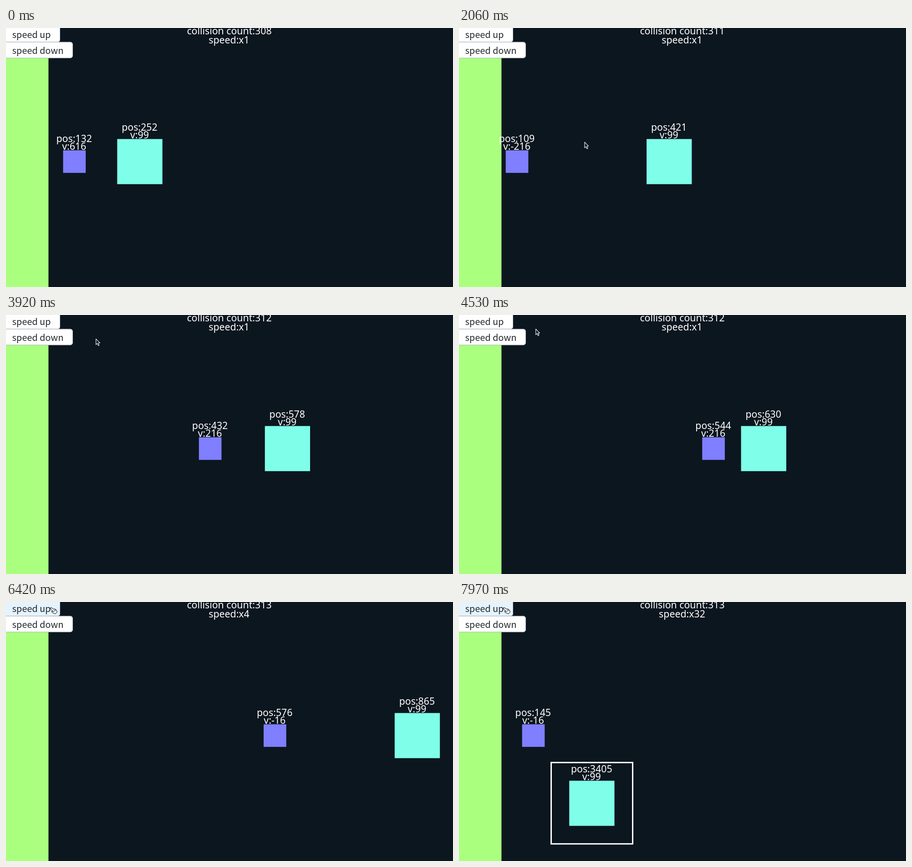
These frames come from a looping animation (982x570 px, 7.99 s). An HTML page with a canvas:

```html
<!DOCTYPE html>
<html lang="en">
<head>
<meta charset="utf-8">
<title>Block collisions</title>
<style>
  html, body { margin: 0; width: 100%; height: 100%; overflow: hidden; background: #0c161f; }
  canvas { display: block; }
</style>
</head>
<body>
<canvas id="stage" width="982" height="570"></canvas>
<script>
const ctx = document.getElementById('stage').getContext('2d');
const LOOP = 7990;
const SCALE = 0.993, OFFSET = -6;
const WALL = 100, SMALL = 50, BIG = 100, MID_Y = 294;
const BIG_V = 99.995;
const LABEL_FONT = '300 21.3px "Noto Sans", sans-serif';
const BUTTON_FONT = '19.9px "Noto Sans CJK JP", "Noto Sans", sans-serif';

// [ms, simulated seconds] at normal speed
const clock = [[0, 0], [1240, 0.986], [2850, 2.367], [3920, 3.267], [5190, 4.335]];
const RATE = 0.842;
// each click doubles the speed
const clicks = [5875, 6238, 6595, 6957, 7322.6];

// [ms, x, y] of the pointer tip
const pointerPath = [
  [1290, 890, 570], [1600, 560, 325], [2000, 300, 260], [2450, 118, 190],
  [2850, 185, 123], [3220, 195, 76], [3920, 197, 52], [4040, 196, 50],
  [4830, 151, 18], [5190, 130, 16], [5560, 97, 12]
];

function interpolate(points, t, col) {
  const next = points.findIndex(p => p[0] > t);
  if (next < 0) return points[points.length - 1][col];
  if (next === 0) return points[0][col];
  const a = points[next - 1], b = points[next];
  return a[col] + (b[col] - a[col]) * (t - a[0]) / (b[0] - a[0]);
}

function simTime(t) {
  const [start, base] = clock[clock.length - 1];
  if (t <= start) return interpolate(clock, t, 1);
  let s = base, from = start, speed = 1;
  for (const click of clicks) {
    if (click >= t) break;
    s += (click - from) / 1000 * RATE * speed;
    from = click;
    speed *= 2;
  }
  return s + (t - from) / 1000 * RATE * speed;
}

// The large block is so heavy that its velocity stays constant.
function simulate(s) {
  let now = 0, x = 131.9, v = 616.92, count = 308;
  const bigAt = time => 252 + BIG_V * time;
  while (true) {
    const wait = v > BIG_V ? (bigAt(now) - x - SMALL) / (v - BIG_V)
      : v < 0 ? (WALL - x) / v : Infinity;
    if (now + wait > s) break;
    now += wait;
    x += v * wait;
    v = v > 0 ? 2 * BIG_V - v : -v;
    count++;
  }
  return { x: x + v * (s - now), v, big: bigAt(s), count };
}

function label(text, x, y) {
  ctx.font = LABEL_FONT;
  ctx.textAlign = 'center';
  ctx.fillStyle = '#fff';
  ctx.fillText(text, x, y);
}

function block(left, midY, size, color, pos, v) {
  const w = size * SCALE, top = midY - w / 2, cx = left + w / 2 - 0.6;
  ctx.fillStyle = color;
  ctx.fillRect(left, top, w, w);
  label('pos:' + Math.trunc(pos), cx, top - 18);
  label('v:' + Math.trunc(v), cx, top - 1.3);
}

function button(text, y, right, hover) {
  ctx.beginPath();
  ctx.roundRect(-10, y + 0.5, right + 9.5, 35, 5);
  ctx.fillStyle = hover ? '#e5f3ff' : '#fff';
  ctx.fill();
  ctx.strokeStyle = '#a9b0b8';
  ctx.lineWidth = 1;
  ctx.stroke();
  ctx.font = BUTTON_FONT;
  ctx.textAlign = 'left';
  ctx.fillStyle = '#212529';
  ctx.fillText(text, 13.5, y + 26);
}

function shape(path, x, y, fill, stroke) {
  ctx.save();
  ctx.translate(x, y);
  ctx.lineWidth = 1.1;
  ctx.lineJoin = 'round';
  const p = new Path2D(path);
  ctx.fillStyle = fill;
  ctx.fill(p);
  ctx.strokeStyle = stroke;
  ctx.stroke(p);
  ctx.restore();
}

const ARROW = 'M.7 .7V13.2L3.6 10.6L5.6 15.3L7.7 14.4L5.7 9.8L9.3 9.5Z';
const HAND = 'M.5 1.2Q1.5 -.2 3 .8L7 3.6L10 3.2L13.2 5.5L15.5 9.5L11.5 14L7 12.2L3 9.6L4 8.2L6.4 8.8L1 3Q0 2 .5 1.2Z';

function pointer(t, hover) {
  if (t < pointerPath[0][0]) return;
  const x = interpolate(pointerPath, t, 1), y = interpolate(pointerPath, t, 2);
  if (!hover) return shape(ARROW, x, y, '#0c161f', '#fff');
  shape(HAND, x, y, '#fff', '#222');
  shape('M6 8L8.5 9.8M8 6.2L10.8 8.3M10 4.8L12.6 7', x, y, 'transparent', '#444');
}

function draw(t) {
  const { x, v, big, count } = simulate(simTime(t));
  const speed = 2 ** clicks.filter(c => c < t).length;
  const hover = t > 5325;

  ctx.fillStyle = '#0c161f';
  ctx.fillRect(0, 0, 982, 570);
  ctx.fillStyle = '#aaff7f';
  ctx.fillRect(0, 0, 93.3, 570);

  block(x * SCALE + OFFSET, MID_Y, SMALL, '#7f7fff', x, v);
  if (big + BIG < 993) {
    block(big * SCALE + OFFSET, MID_Y, BIG, '#7fffe9', big, BIG_V);
  } else {
    ctx.strokeStyle = '#fff';
    ctx.lineWidth = 3;
    ctx.strokeRect(202.5, 353.3, 179, 179);
    block(242.2, 443, BIG, '#7fffe9', big, BIG_V);
  }

  label('collision count:' + count, 490.5, 14.3);
  label('speed:x' + speed, 490, 34.3);
  button('speed up', -4.5, 119, hover);
  button('speed down', 30.5, 147, false);
  pointer(t, hover);
}

// short stall, then coarse steps at high speed
function frameTime(t) {
  if (t < 7260) return Math.min(t, 7160);
  return Math.floor((t - 10) / 20) * 20 + 10;
}

const begin = performance.now();
function tick() {
  draw(frameTime((performance.now() - begin) % LOOP));
  requestAnimationFrame(tick);
}
tick();
</script>
</body>
</html>
```
